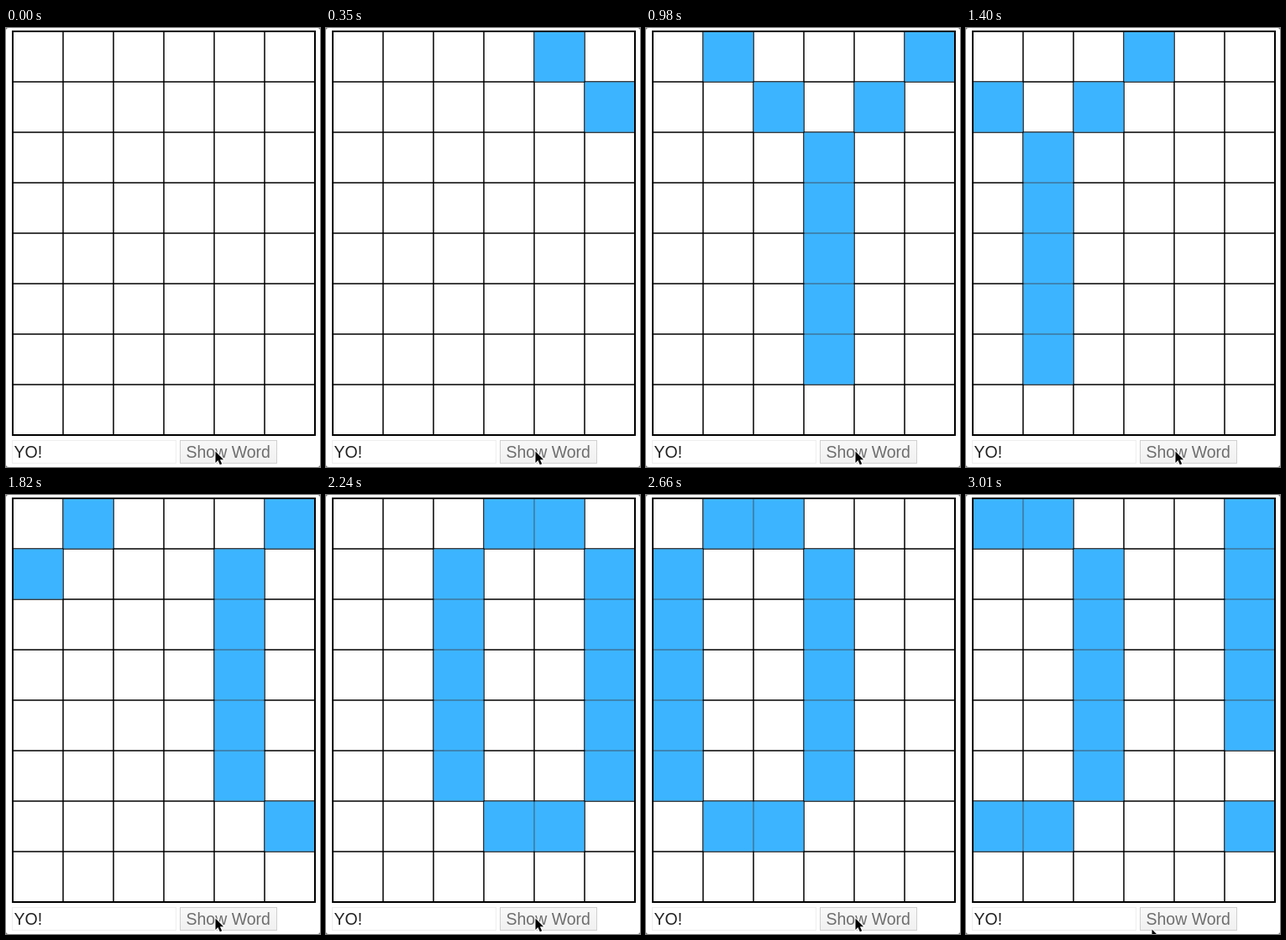
These frames come from a looping animation (374 by 522 pixels, 3.08 s). An HTML page with a canvas:

```html
<!DOCTYPE html>
<html lang="en">
<head>
<meta charset="utf-8">
<title>Scrolling word</title>
<style>
  html, body { margin: 0; width: 100%; height: 100%; overflow: hidden; background: #666; }
  canvas { display: block; border-radius: 3px; }
</style>
</head>
<body>
<canvas id="stage" width="374" height="522"></canvas>
<script>
const ctx = document.getElementById('stage').getContext('2d');
const LOOP = 3080, STEP = 210, FIRST_STEP = 140;
const COLS = 6, ROWS = 8, CELL = 60, LEFT = 8, TOP = 4;

// The word as a strip of lit cells; the window shows six columns of it.
const WORD = [
  '#...#...##...#',
  '.#.#...#..#..#',
  '..#....#..#..#',
  '..#....#..#..#',
  '..#....#..#..#',
  '..#....#..#...',
  '..#.....##...#'
];

function drawGrid() {
  ctx.strokeStyle = '#000';
  ctx.lineWidth = 1.5;
  ctx.beginPath();
  for (let c = 1; c < COLS; c++) {
    ctx.moveTo(LEFT + c * CELL, TOP);
    ctx.lineTo(LEFT + c * CELL, TOP + ROWS * CELL);
  }
  for (let r = 1; r < ROWS; r++) {
    ctx.moveTo(LEFT, TOP + r * CELL);
    ctx.lineTo(LEFT + COLS * CELL, TOP + r * CELL);
  }
  ctx.stroke();
  ctx.lineWidth = 2;
  ctx.strokeRect(LEFT, TOP, COLS * CELL, ROWS * CELL);
}

function drawWord(offset) {
  ctx.fillStyle = '#3cb4ff';
  WORD.forEach((line, row) => {
    for (let col = 0; col < COLS; col++) {
      if (line[col - offset] === '#') {
        ctx.fillRect(LEFT + col * CELL + 0.4, TOP + row * CELL + 0.4, CELL - 0.8, CELL - 0.8);
      }
    }
  });
}

function drawBox(x, width, fill, border) {
  ctx.fillStyle = fill;
  ctx.fillRect(x, 490, width, 28);
  ctx.strokeStyle = border;
  ctx.lineWidth = 1;
  ctx.strokeRect(x + 0.5, 490.5, width - 1, 27);
}

function drawControls() {
  const shade = ctx.createLinearGradient(0, 490, 0, 518);
  shade.addColorStop(0, '#f8f8f8');
  shade.addColorStop(1, '#f0f0f0');
  drawBox(7, 196, '#fff', '#eee');
  drawBox(207, 116, shade, '#d0d0d0');
  ctx.font = '19.5px "Liberation Sans", Arial, sans-serif';
  ctx.fillStyle = '#222';
  ctx.fillText('YO!', 9.5, 511);
  ctx.fillStyle = '#6e6e6e';
  ctx.fillText('Show Word', 214.5, 511);
}

const arrow = new Path2D('M0 0V13.4L3 10.6L5.3 15.8L7.7 14.8L5.4 9.7H9.6Z');

function drawCursor(time) {
  const p = Math.min(1, Math.max(0, Math.floor((time - 2660) / 70) / 5));
  ctx.save();
  ctx.translate(249.5 - 28 * p, 503.5 + 13 * p);
  ctx.strokeStyle = '#fff';
  ctx.lineWidth = 1.6;
  ctx.stroke(arrow);
  ctx.fillStyle = '#000';
  ctx.fill(arrow);
  ctx.restore();
}

function draw(now) {
  const time = now % LOOP;
  ctx.fillStyle = '#fff';
  ctx.fillRect(0, 0, 374, 522);
  drawGrid();
  drawWord(5 - Math.floor((time - FIRST_STEP) / STEP));
  drawGridFrame();
  drawControls();
  drawCursor(time);
  requestAnimationFrame(draw);
}

// Keeps the outer border solid next to lit cells.
function drawGridFrame() {
  ctx.strokeStyle = '#000';
  ctx.lineWidth = 2;
  ctx.strokeRect(LEFT, TOP, COLS * CELL, ROWS * CELL);
}

requestAnimationFrame(draw);
</script>
</body>
</html>
```
